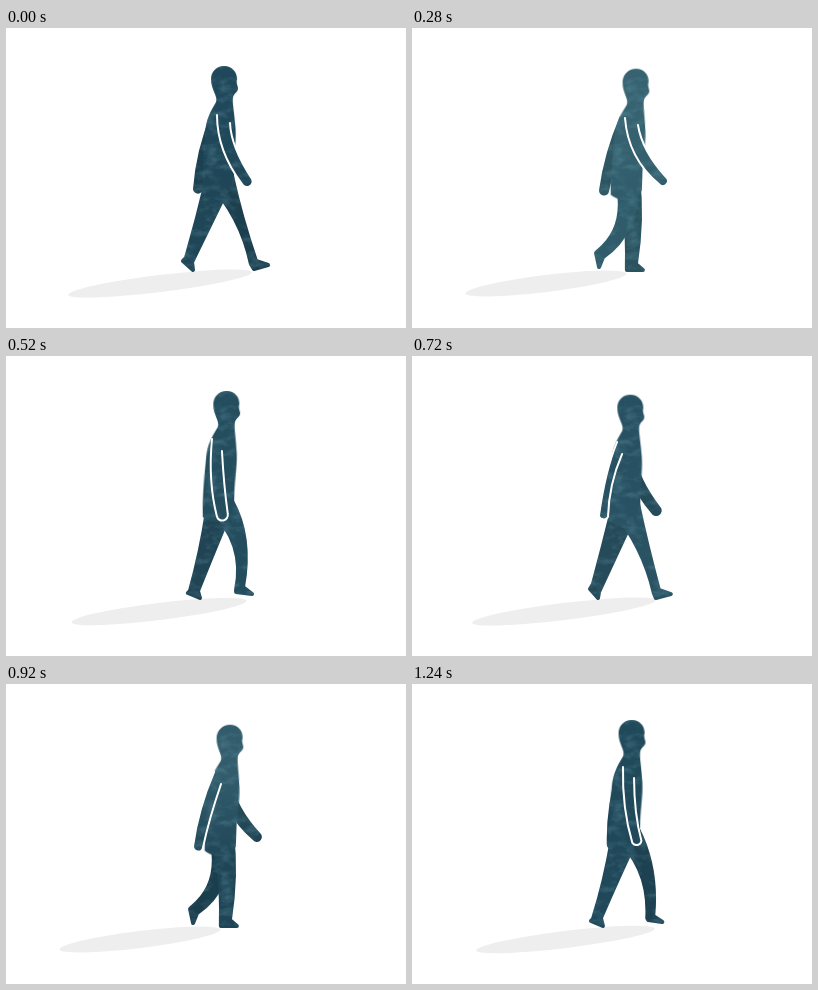
Animation, 400 px wide and 300 px high, one loop 1280 ms. Source, as an HTML page without scripts:

```html
<!DOCTYPE html>
<html lang="en">
<head>
<meta charset="utf-8">
<title>Walk cycle</title>
<style>
html, body { margin: 0; width: 100%; height: 100%; overflow: hidden; background: #fff; }
svg { display: block; width: 100vw; height: 100vh; }

/* One cycle is two steps; the far limbs run half a cycle behind. */
.leg, .arm, stop { animation: 1280ms linear infinite; }
.body, .shadow { animation: 640ms linear infinite; }
.leg { animation-name: leg; fill: url(#ink); stroke: url(#ink); stroke-width: 4; stroke-linejoin: round; }
.arm { animation-name: arm; fill: url(#ink); stroke: #fff; stroke-width: 2; stroke-linecap: round; }
.body { animation-name: body; fill: url(#ink); transform-origin: 213px 155px; }
.shadow { animation-name: shadow; fill: #eee; transform: rotate(-7deg); transform-box: fill-box; transform-origin: center; }
.far { filter: brightness(.9); }
.far .leg { animation-delay: 0ms; }
.far .arm { animation-delay: -640ms; stroke: none; }
.near.leg { animation-delay: -640ms; }
.upper { animation-name: upper; }
.lower { animation-name: lower; }

@keyframes leg {
  0%, 100% { d: path("M201 152Q235 188 245 236L248 241L262 237L250 233Q235 189 226 148Z"); }
  6.25% { d: path("M200 153Q231 190 242 237L244 242L259 238L247 234Q235 190 226 148Z"); }
  15.625% { d: path("M205 156Q222 180 222 238L223 242L239 241L230 236Q233 190 227 150Z"); }
  21.875% { d: path("M206 156Q216 185 215 237L215 242L231 242L224 236Q231 190 226 150Z"); }
  34.375% { d: path("M204 156Q211 195 199 237L198 242L214 242L209 236Q227 191 228 150Z"); }
  40.625% { d: path("M201 155Q195 195 184 235L182 237L194 242L192 235Q210 190 226 152Z"); }
  46.875% { d: path("M200 155Q193 197 181 235L179 237L191 242L189 234Q208 190 226 152Z"); }
  50% { d: path("M200 154Q191 192 180 230L177 233L187 242L186 234Q205 195 226 152Z"); }
  56.25% { d: path("M200 154Q191 190 181 228L178 233L186 242L187 236Q206 195 226 152Z"); }
  65.625% { d: path("M203 150Q213 200 182 226L180 227L186 242L187 236Q221 203 227 152Z"); }
  71.875% { d: path("M204 150Q217 198 186 223L184 225L187 239L191 229Q226 205 226 152Z"); }
  84.375% { d: path("M204 152Q212 200 197 219L196 222L200 233L205 229Q236 192 228 152Z"); }
  90.625% { d: path("M203 152Q240 187 230 234L230 236L246 238L237 231Q246 181 226 145Z"); }
  96.875% { d: path("M202 152Q238 183 235 234L236 236L250 238L241 232Q246 184 226 145Z"); }
}

@keyframes arm {
  0%, 100% { d: path("M211 87Q211 123 236 156A5 5 0 0 0 246 151Q225 119 224 95"); }
  6.25% { d: path("M210 88Q211 124 239 157A5 5 0 0 0 249 152Q226 122 223 97"); }
  15.625% { d: path("M213 90Q214 126 249 157A5 5 0 0 0 257 150Q231 124 226 99"); }
  21.875% { d: path("M213 90Q216 130 247 156A5 5 0 0 0 255 150Q230 123 226 97"); }
  34.375% { d: path("M211 87Q211 125 233 159A5 5 0 0 0 242 155Q228 122 222 96"); }
  40.625% { d: path("M206 83Q202 125 211 160A5 5 0 0 0 222 158Q218 130 216 95"); }
  50% { d: path("M205 86Q190 122 187 161A5 5 0 0 0 197 161Q199 130 211 98"); }
  56.25% { d: path("M205 86Q193 115 187 160A5 5 0 0 0 196 161Q197 128 210 98"); }
  65.625% { d: path("M208 88Q195 115 180 160A5 5 0 0 0 189 162Q196 132 214 102"); }
  71.875% { d: path("M208 88Q192 125 187 162A5 5 0 0 0 197 163Q203 135 215 100"); }
  84.375% { d: path("M210 85Q198 126 199 161A5 5 0 0 0 210 161Q210 128 219 97"); }
  96.875% { d: path("M211 83Q210 125 220 159A5 5 0 0 0 229 157Q222 130 222 94"); }
}

@keyframes body {
  0%, 100% { transform: translate(0, 0) skewX(0deg); }
  12.5% { transform: translate(.3px, .7px) skewX(0deg); }
  31.25% { transform: translate(2px, 3.5px) skewX(-1.7deg); }
  43.75% { transform: translate(2px, 2.8px) skewX(-2deg); }
  68.75% { transform: translate(2px, 0) skewX(-1.3deg); }
  81.25% { transform: translate(0, -3px) skewX(-1.3deg); }
  93.75% { transform: translate(0, -2px) skewX(-.9deg); }
}

@keyframes shadow {
  0%, 100% { cx: 154px; rx: 92.5px; }
  12.5% { cx: 152px; rx: 92.5px; }
  31.25% { cx: 141px; rx: 85px; }
  43.75% { cx: 134px; rx: 81px; }
  68.75% { cx: 139px; rx: 86px; }
  81.25% { cx: 153px; rx: 88px; }
  93.75% { cx: 153.5px; rx: 90px; }
}

@keyframes upper {
  0%, 100% { stop-color: #1f485a; }
  21.875% { stop-color: #376371; }
  40.625% { stop-color: #244d5e; }
  56.25% { stop-color: #275162; }
  65.625% { stop-color: #3b6674; }
  84.375%, 96.875% { stop-color: #20495a; }
}

@keyframes lower {
  0%, 100% { stop-color: #1f4657; }
  21.875% { stop-color: #2f5b6a; }
  40.625% { stop-color: #234c5d; }
  56.25% { stop-color: #295263; }
  65.625% { stop-color: #1d4354; }
  84.375%, 96.875% { stop-color: #20485a; }
}
</style>
</head>
<body>
<svg viewBox="0 0 400 300">
  <defs>
    <linearGradient id="ink" gradientUnits="userSpaceOnUse" x1="0" y1="90" x2="0" y2="175">
      <stop class="upper" offset="0"/>
      <stop class="lower" offset="1"/>
    </linearGradient>
    <!-- Soft watercolour mottling that leaves white lines clean -->
    <filter id="wash" filterUnits="userSpaceOnUse" x="160" y="20" width="120" height="240" color-interpolation-filters="sRGB">
      <feTurbulence type="fractalNoise" baseFrequency=".07 .12" numOctaves="3" seed="4"/>
      <feColorMatrix values="0 0 0 0 .4  0 0 0 0 .6  0 0 0 0 .66  .9 0 0 0 -.4"/>
      <feComposite in2="SourceAlpha" operator="in"/>
      <feBlend in2="SourceGraphic" mode="lighten"/>
    </filter>
  </defs>
  <ellipse class="shadow" cx="154" cy="255.5" rx="92.5" ry="8.5"/>
  <g filter="url(#wash)">
    <g class="far">
      <path class="arm"/>
      <path class="leg"/>
    </g>
    <path class="near leg"/>
    <path class="body" d="M218 38C226 38 231 44 231 51C230 54 231 56 232 60C232 64 229 64 227 69C226 74 228 82 229 95C231 110 228 125 228 140L228 160Q212 176 197 164C196 140 198 120 199 105C200 92 204 84 210 74C212 68 205 62 205 51C205 44 210 38 218 38Z"/>
    <path class="near arm"/>
  </g>
</svg>
</body>
</html>
```
